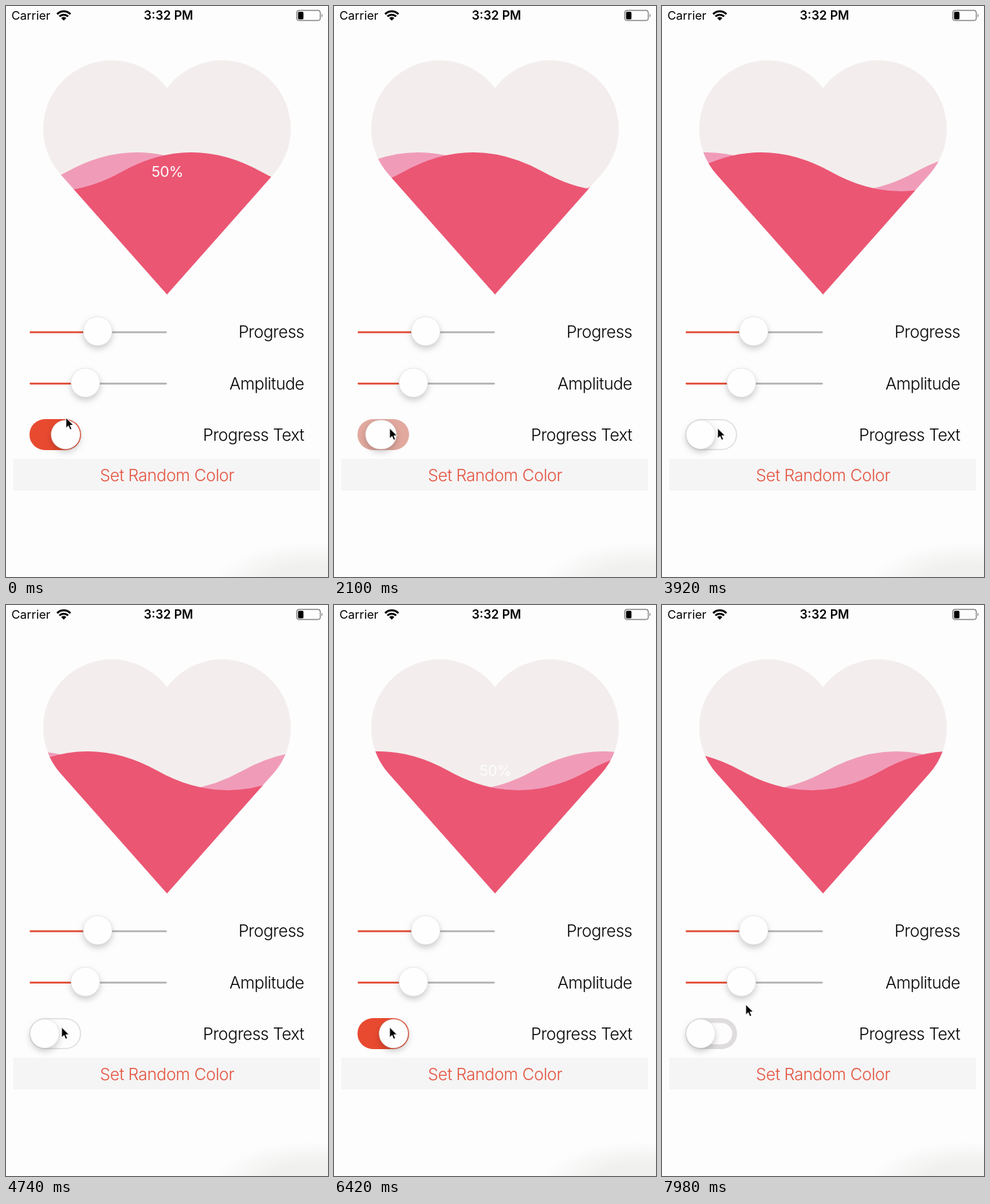
An HTML page for the animation above (8 s loop, 446 by 792 pixels).

```html
<!DOCTYPE html>
<html lang="en">
<head>
<meta charset="utf-8">
<title>Heart wave progress</title>
<style>
  html, body { margin: 0; width: 100%; height: 100%; overflow: hidden; background: #fdfdfd; }
  svg { display: block; width: 100vw; height: 100vh; }
  text { font-family: Inter, Roboto, sans-serif; }
  .label { font-size: 23px; font-weight: 350; letter-spacing: -.02em; }
  .right { text-anchor: end; }
  .middle { text-anchor: middle; }
  .thumb { fill: #fefefe; stroke: #d8d8d8; stroke-width: .5; filter: drop-shadow(0 4px 4px rgba(0, 0, 0, .2)); }
  .filled { stroke: #e24a33; stroke-width: 2.6; stroke-linecap: round; }
  .rest { stroke: #b1b1b5; stroke-width: 2.6; stroke-linecap: round; }
</style>
</head>
<body>
<svg viewBox="0 0 446 792">
  <defs>
    <path id="heart" d="M223 400L76 234A95 95 0 1 1 223 114A95 95 0 1 1 370 234Z"/>
    <clipPath id="heartClip"><use href="#heart"/></clipPath>
    <radialGradient id="glow">
      <stop offset=".45" stop-color="#f0f0ef"/>
      <stop offset="1" stop-color="#f0f0ef" stop-opacity="0"/>
    </radialGradient>
  </defs>

  <!-- Status bar -->
  <text x="7.5" y="19" font-size="16.5">Carrier</text>
  <g fill="none" stroke="#000" stroke-width="2.8">
    <path d="M70.8 11.2A13 13 0 0 1 89.2 11.2"/>
    <path d="M74 14.6A8.5 8.5 0 0 1 86 14.6"/>
  </g>
  <path d="M76.5 16.8A5 5 0 0 1 83.5 16.8L80 20.3Z"/>
  <text class="middle" x="225" y="19.3" font-size="17" font-weight="600">3:32 PM</text>
  <rect x="402.7" y="6.2" width="32.6" height="14" rx="3.5" fill="none" stroke="#777" stroke-width="1.2"/>
  <rect x="404.5" y="8" width="7.5" height="10.4" rx="1.5"/>
  <path d="M437 10.5Q439.5 13.2 437 16Z" fill="#777"/>

  <!-- Heart -->
  <use href="#heart" fill="#f3eeed"/>
  <g clip-path="url(#heartClip)">
    <path id="backWave" fill="#f09cb9"/>
    <path id="frontWave" fill="#eb5673"/>
  </g>
  <text id="percent" class="middle" x="223.5" y="236.5" font-size="20.5" letter-spacing="-.4" fill="#fdfdfd">50%</text>

  <!-- Controls -->
  <path class="rest" d="M127 452.5H221.5"/>
  <path class="filled" d="M34 452.5H127"/>
  <circle class="thumb" cx="127" cy="451" r="20"/>
  <path class="rest" d="M110 523.7H221.5"/>
  <path class="filled" d="M34 523.7H110"/>
  <circle class="thumb" cx="110" cy="522.5" r="20"/>
  <rect id="track" x="32.5" y="573" width="71.5" height="43" rx="21.5"/>
  <rect id="hollow" fill="#fdfdfd"/>
  <rect id="knob" class="thumb" y="574.5" height="40" rx="20"/>
  <text class="label right" x="413" y="460">Progress</text>
  <text class="label right" x="413" y="531.5">Amplitude</text>
  <text class="label right" x="413" y="603">Progress Text</text>
  <rect x="10" y="628" width="425" height="44" fill="#f5f5f5"/>
  <text class="label middle" x="223" y="659" fill="#e4533f">Set Random Color</text>
  <ellipse cx="425" cy="800" rx="135" ry="56" fill="url(#glow)"/>

  <path id="cursor" d="M0 0V14.5L3.4 11.4L5.7 16.8L8.2 15.7L5.9 10.5H10.5Z" stroke="#fff" stroke-width="1"/>
</svg>
<script>
const LOOP = 8000;
const WAVE = { half: 193.5, amplitude: 27, middle: 230, start: 257, speed: 1.425, lag: 76 };
const OFF = [222, 220, 220], ON = [232, 74, 48];
const TAP_OFF = 42, TAP_ON = 108, TAP_OFF_AGAIN = 164;

const el = id => document.getElementById(id);
const set = (id, attrs) => {
  for (const name in attrs) el(id).setAttribute(name, attrs[name]);
};
const mix = (a, b, k) => a + (b - a) * k;
const ramp = (n, from, to) => {
  const k = Math.min(1, Math.max(0, (n - from) / (to - from)));
  return k * k * (3 - 2 * k);
};

// Uneven playback: each 140 ms holds three steps of 100, 20 and 20 ms.
function stepAt(ms) {
  const rest = ms % 140;
  return 3 * Math.floor(ms / 140) + (rest < 100 ? 0 : rest < 120 ? 1 : 2);
}

// Alternating parabolic arcs, each half a wavelength wide.
function wavePath(crest) {
  const { half, amplitude, middle } = WAVE;
  let x = crest - 2.5 * half;
  let d = `M${x} 402V${middle}`;
  for (let i = 0; i < 6; i++, x += half) {
    const peak = middle + (i % 2 ? 2 : -2) * amplitude;
    d += `Q${x + half / 2} ${peak} ${x + half} ${middle}`;
  }
  return d + "V402Z";
}

function drawSwitch(n) {
  const on = 1 - ramp(n, TAP_OFF, TAP_OFF + 5) + ramp(n, TAP_ON, TAP_ON + 5)
    - ramp(n, TAP_OFF_AGAIN, TAP_OFF_AGAIN + 5);
  const open = ramp(n, TAP_OFF + 2, TAP_OFF + 10) - ramp(n, TAP_ON - 3, TAP_ON + 2)
    + ramp(n, TAP_OFF_AGAIN + 1, TAP_OFF_AGAIN + 10);
  const inset = mix(21.5, 1.5, open);
  const stretch = 12 * on * (1 - on);
  set("track", { fill: `rgb(${OFF.map((c, i) => Math.round(mix(c, ON[i], on)))})` });
  set("hollow", {
    x: 32.5 + inset, y: 573 + inset, width: 71.5 - 2 * inset,
    height: 43 - 2 * inset, rx: 21.5 - inset
  });
  set("knob", { x: mix(33.5, 62.5, on), width: 40 + stretch });
}

function draw(n) {
  const crest = WAVE.start - WAVE.speed * n;
  set("frontWave", { d: wavePath(crest) });
  set("backWave", { d: wavePath(crest - WAVE.lag) });

  const shown = n < TAP_OFF || (n >= TAP_ON + 2 && n < TAP_OFF_AGAIN);
  set("percent", { visibility: shown ? "visible" : "hidden" });
  drawSwitch(n);

  const arrive = ramp(n, 0, 10), leave = ramp(n, TAP_OFF_AGAIN, 171);
  const x = mix(mix(83, 77, arrive), 116, leave);
  const y = mix(mix(571, 585.5, arrive), 554, leave);
  set("cursor", { transform: `translate(${x} ${y})` });
}

function tick() {
  draw(stepAt(performance.now() % LOOP));
  requestAnimationFrame(tick);
}
tick();
</script>
</body>
</html>
```
